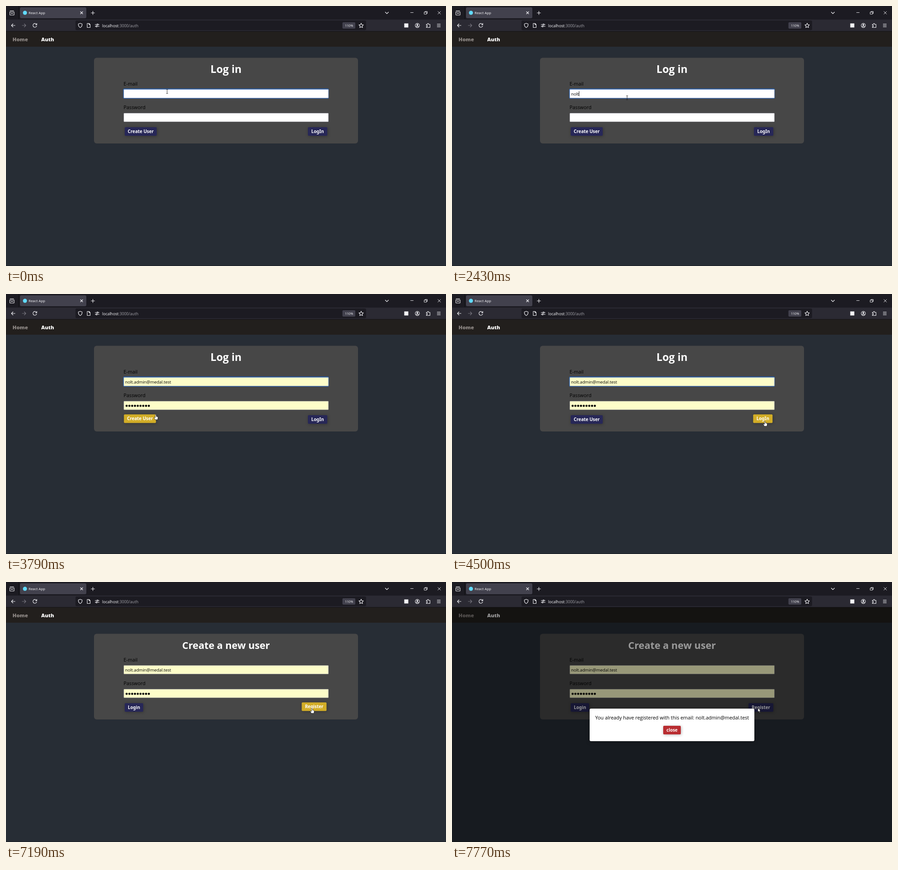
Write an HTML page that moves like this. It is 975 px wide and 575 px high and loops after 8 s.

```html
<!DOCTYPE html>
<html lang="en">
<head>
<meta charset="utf-8">
<title>Login form</title>
<style>
  html, body { margin: 0; width: 100%; height: 100%; overflow: hidden; background: #272d35; }
  svg { display: block; width: 975px; height: 575px; font-family: "Open Sans", "Noto Sans", sans-serif; }
  .icon { fill: none; stroke: #f4f4f8; stroke-width: 1.1; stroke-linecap: round; stroke-linejoin: round; }
  .nav { font-size: 11.3px; font-weight: 800; }
  .label { font-size: 10.8px; }
  .title { font-weight: 700; fill: #fff; text-anchor: middle; }
  .field { stroke: #8f8f9d; stroke-width: .6; }
  .button { filter: drop-shadow(1px 1px 3px rgba(0, 0, 0, .3)); }
  .button text { font: 700 9.8px "Noto Sans", "Open Sans", sans-serif; fill: #fff; text-anchor: middle; }
  .pointer { fill: #fff; stroke: #111; stroke-width: .7; stroke-linejoin: round; }
</style>
</head>
<body>
<svg viewBox="0 0 975 575">
  <!-- browser window -->
  <rect width="975" height="30" fill="#1c1b22"/>
  <path d="M28.5 0V29" stroke="#0e0e11"/>
  <rect y="30" width="975" height="26" fill="#2b2a33"/>
  <rect x="31" y="3" width="147" height="24" rx="3" fill="#42414d"/>
  <circle cx="42" cy="15" r="4.5" fill="#61dafb"/>
  <text x="50" y="18" font-size="7.9" fill="#fbfbfe">React App</text>
  <rect x="154" y="32" width="644" height="21.500" rx="3" fill="#1c1b22"/>
  <text x="213" y="46.500" font-size="8.7" fill="#fbfbfe">localhost<tspan fill="#a3a3aa">:3000/auth</tspan></text>
  <rect x="745.500" y="36" width="28.500" height="14" rx="2" fill="#42414d"/>
  <text x="760" y="45.700" font-size="7.2" fill="#fbfbfe" text-anchor="middle">110%</text>
  <rect x="882.500" y="38.500" width="9" height="9" fill="#f4f4f8"/>
  <g class="icon">
    <path d="M9 10.500H17M8.500 13H17.500Q18 13 18 13.500V19Q18 20 17 20H9.500Q8.500 20 8.500 19ZM11.500 15.500V16.500H15V15.500"/>
    <path d="M165 12.500L170 17.500M170 12.500L165 17.500M192.500 11.500V19M188.700 15.200H196.300M840.500 13.500L844 17L847.500 13.500"/>
    <path d="M896.500 14.500H902.500M927 13.500H932V18H927ZM928.500 13.500V12H933.500V16.500H932M957 12L963 18M963 12L957 18" stroke-width=".9"/>
    <path d="M20 43H12M15.500 39.500L12 43L15.500 46.500"/>
    <path d="M36 43H44M40.500 39.500L44 43L40.500 46.500" stroke="#77767f"/>
    <path d="M67.500 40.500A4.200 4.200 0 1 0 68 44M68.300 38.500V41.500H65.300"/>
    <path d="M164.500 38.200L168.700 39.700Q169 45.500 164.500 47.700Q160 45.500 160.300 39.700ZM180 38.500H184L186.500 41V47.500H180ZM183.800 38.700V41.200H186.300"/>
    <path d="M197.500 41H201M204.500 41H206.500M197.500 45H199M202.500 45H206.500"/>
    <circle cx="202.800" cy="41" r="1.400"/><circle cx="200.700" cy="45" r="1.400"/>
    <path d="M787 38L788.500 41.400L792 41.800L789.400 44.200L790.100 47.700L787 45.900L783.900 47.700L784.600 44.200L782 41.800L785.500 41.400Z"/>
    <circle cx="911.500" cy="43" r="4.600"/><circle cx="911.500" cy="41.700" r="1.300" fill="#f4f4f8"/>
    <path d="M908.700 45.700Q911.500 43.500 914.300 45.700"/>
    <path d="M931.500 40.500H934V39.500Q935.200 37.500 936.400 39.500V40.500H939.500V47.500H931.500V45.500H933Q935 44.200 933 43H931.500Z"/>
    <path d="M955.500 40H962.500M955.500 43H962.500M955.500 46H962.500"/>
  </g>

  <!-- page -->
  <rect y="56" width="975" height="34" fill="#221f1d"/>
  <path d="M0 56H975" stroke="#111013"/>
  <path d="M0 574.500H975" stroke="#1b2026"/>
  <text class="nav" x="14.500" y="78" fill="#918b88">Home</text>
  <text class="nav" x="78" y="78" fill="#fff">Auth</text>
  <rect x="195" y="114.500" width="585" height="189.500" rx="6" fill="#474747"/>
  <text class="title" id="title" x="487.500" y="148"></text>
  <text class="label" x="260.500" y="175.500">E-mail</text>
  <text class="label" x="260.500" y="228">Password</text>
  <rect id="focus" x="259.700" y="182.700" width="455.600" height="22" rx="2.500" fill="#1d63c4"/>
  <rect class="field" id="emailBox" x="261" y="184.500" width="453.500" height="19" rx="1"/>
  <rect class="field" id="passwordBox" x="261" y="237" width="453.500" height="19" rx="1"/>
  <text id="email" x="264" y="197.500" font-size="9.37"></text>
  <path id="caret" d="M.5 188.500V199.500" stroke="#000" stroke-width=".9"/>
  <path id="dots" d="M267.300 247.300H317" stroke="#000" stroke-width="4.800" stroke-linecap="round" stroke-dasharray="0 6.15"/>
  <g id="left" class="button"><rect y="268" height="19" rx="2"/><text y="281.200"></text></g>
  <g id="right" class="button"><rect y="268" height="19" rx="2"/><text y="281.200"></text></g>

  <g id="modal">
    <rect y="56" width="975" height="519" opacity=".4"/>
    <rect x="305" y="280" width="365" height="72" rx="3" fill="#fff" style="filter:drop-shadow(0 1px 4px rgba(0,0,0,.3))"/>
    <text id="message" x="487.700" y="304.300" font-size="10.9" text-anchor="middle"></text>
    <g class="button"><rect x="468" y="318" width="39" height="19" rx="2" fill="#b92d31"/><text x="487.500" y="331.300">close</text></g>
  </g>

  <g id="cursor">
    <path id="arrow" class="pointer" d="M0 0V8.300L2 6.500L3.300 9.500L4.700 8.900L3.500 6H6Z"/>
    <path id="beam" d="M-2 -4.500H-.5L0 -4L.5 -4.500H2M0 -4V4M-2 4.500H-.5L0 4L.5 4.500H2" fill="none" stroke="#222" stroke-width=".9"/>
    <path id="hand" class="pointer" d="M-1.100 1Q0 -.7 1.100 1V4.200L4.200 5Q5.200 5.500 5 7L4.200 11.500H-1.200L-3.700 7.300Q-3.700 5.800 -2.500 6.300L-1.100 7.300Z"/>
  </g>
</svg>
<script>
const LOOP = 8000, SUBMIT = 7440, SWITCH = 6270, FILL = 3100;
const ADDRESS = "nolt.admin@medal.test";
const KEYSTROKES = [430, 650, 800, 1460];
const CARET_ON = [[80, 1140], [1460, 1630], [2190, 2690], [FILL, 3600], [4200, 4450], [4840, 5400], [5900, 6100]];
// time, x, y
const PATH = [
  [0, 357, 189], [2429, 357, 189], [2430, 388, 203], [2450, 388, 203], [2520, 404, 203], [2620, 404, 203],
  [2840, 384, 212], [3180, 384, 212], [3400, 368, 238], [3500, 368, 238], [3950, 312, 282], [4130, 312, 282],
  [4500, 693.5, 281], [4770, 693.5, 281], [4840, 691.5, 280.5], [5160, 691, 280.5], [5270, 691, 280.5],
  [5650, 500, 287], [6030, 305.5, 280], [6440, 305.5, 280], [6700, 420, 306], [6900, 580, 306],
  [7060, 668, 286], [7190, 678, 279], [LOOP, 678, 279]
];
const $ = id => document.getElementById(id);
const show = (id, on) => $(id).style.display = on ? "" : "none";
const inside = (p, x, y, w, h) => p.x >= x && p.x <= x + w && p.y >= y && p.y <= y + h;

function pointerAt(t) {
  const i = PATH.findIndex(key => key[0] > t);
  const [t0, x0, y0] = PATH[i - 1], [t1, x1, y1] = PATH[i];
  const k = (t - t0) / (t1 - t0);
  return { x: x0 + (x1 - x0) * k, y: y0 + (y1 - y0) * k };
}

function setButton(id, x, width, label, hover) {
  const [box, text] = $(id).children;
  box.setAttribute("x", x);
  box.setAttribute("width", width);
  box.setAttribute("fill", hover ? "#d2ad27" : "#272757");
  text.setAttribute("x", x + width / 2);
  text.textContent = label;
  $(id).setAttribute("transform", hover ? "translate(-1.7 -1.7)" : "");
}

function render(t) {
  const register = t >= SWITCH, filled = t >= FILL, modal = t >= SUBMIT;
  const p = pointerAt(t);

  $("title").textContent = register ? "Create a new user" : "Log in";
  $("title").setAttribute("font-size", register ? 21.7 : 23.2);
  $("email").textContent = filled ? ADDRESS : ADDRESS.slice(0, KEYSTROKES.filter(k => k <= t).length);
  for (const id of ["emailBox", "passwordBox"]) $(id).setAttribute("fill", filled ? "#fdfdc9" : "#fff");
  show("dots", filled);
  show("focus", t < 6100);
  show("caret", CARET_ON.some(([on, off]) => t >= on && t < off));
  $("caret").setAttribute("transform", `translate(${264 + $("email").getComputedTextLength()})`);

  const leftWidth = register ? 41 : 71, rightWidth = register ? 55 : 43;
  const active = !modal && (t < 460 || t >= 2430);
  const overLeft = active && inside(p, 262, 266, leftWidth, 21);
  const overRight = active && inside(p, 711 - rightWidth, 266, rightWidth, 21);
  setButton("left", 263, leftWidth, register ? "Login" : "Create User", overLeft);
  setButton("right", 712 - rightWidth, rightWidth, register ? "Register" : "LogIn", overRight);
  show("modal", modal);

  const hand = overLeft || overRight || (modal && t < 7770);
  const beam = inside(p, 261, 184, 454, 19) || inside(p, 261, 237, 454, 19);
  show("hand", hand);
  show("beam", beam);
  show("arrow", !hand && !beam);
  show("cursor", t < 460 || t >= 2430);
  $("cursor").setAttribute("transform", `translate(${p.x} ${p.y})`);
}

$("message").textContent = `You already have registered with this email: ${ADDRESS}`;
const start = performance.now();
function tick() {
  render((performance.now() - start) % LOOP);
  requestAnimationFrame(tick);
}
tick();
</script>
</body>
</html>
```
